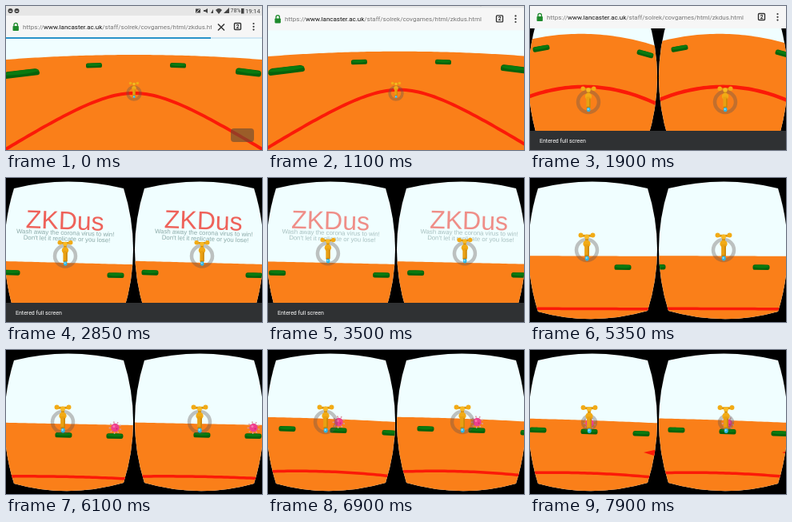
These frames come from a looping animation (320 by 180 pixels, 8000 ms). An HTML page with a canvas:

```html
<!DOCTYPE html>
<html lang="en">
<head>
<meta charset="utf-8">
<title>Tap game</title>
<style>
  html, body { margin: 0; width: 100%; height: 100%; overflow: hidden; background: #000; }
  #stage { position: relative; width: 320px; height: 180px; overflow: hidden; font-family: Roboto, Arial, sans-serif; }
  #stage div, #stage svg, canvas { position: absolute; left: 0; top: 0; }
  canvas { width: 320px; height: 180px; }
  #status { width: 320px; height: 12px; background: #e6e6e6; color: #444; }
  #status span { position: absolute; top: 1px; font-size: 7.5px; line-height: 11px; }
  #bar { width: 320px; height: 28px; background: #f6f6f6; }
  #url { left: 21px !important; top: 7px !important; height: 15px; overflow: hidden; white-space: nowrap; font-size: 8px; line-height: 15px; color: #777; }
  #url b { font-weight: 400; color: #111; }
  #load { top: 27px !important; width: 320px; height: 2px; background: #cfe6f3; }
  #fill { height: 2px; background: #2a93c9; }
  #toast { width: 320px; height: 24px; background: #2f3133; color: #fff; font-size: 7px; line-height: 26px; text-indent: 12px; }
</style>
</head>
<body>
<div id="stage">
  <canvas id="view"></canvas>
  <div id="bar">
    <svg width="320" height="28" fill="none" stroke="#333">
      <path d="M10 13.500v-2a2.200 2.200 0 0 1 4.400 0v2" stroke="#1e8a2c" stroke-width="1.3"/>
      <rect x="8.500" y="13" width="7.400" height="6" rx=".8" fill="#1e8a2c" stroke="none"/>
      <path id="stop" d="M265 10.500l8 8m0-8l-8 8" stroke-width="1.5"/>
      <rect x="285.500" y="9.500" width="8" height="8" rx="1" stroke-width="1.4"/>
      <text x="289.500" y="16" font-size="6.5" font-weight="700" text-anchor="middle" fill="#222" stroke="none">2</text>
      <g fill="#333" stroke="none"><circle cx="309.500" cy="10" r="1.1"/><circle cx="309.500" cy="13.800" r="1.1"/><circle cx="309.500" cy="17.600" r="1.1"/></g>
    </svg>
    <div id="url">https://<b>www.lancaster.ac.uk</b>/staff/solrek/covgames/html/zkdus.html</div>
    <div id="load"><div id="fill"></div></div>
  </div>
  <div id="status">
    <svg width="320" height="12" fill="#444">
      <circle cx="5.500" cy="6" r="3"/><circle cx="13.500" cy="6" r="3"/>
      <path d="M4 6.500h3M12 6.500h3" stroke="#e6e6e6"/>
      <rect x="237" y="3.500" width="6" height="5"/>
      <path d="M238 8l4-4" stroke="#e6e6e6"/>
      <path d="M247 5h2l3-2v6l-3-2h-2zM259 9V4l-3 5z"/>
      <path d="M262 5q4-4 8 0l-4 5zM272 9l7-7v7z"/>
      <rect x="294" y="3" width="3.500" height="6.500"/>
    </svg>
    <span style="left:280.500px;font-size:7px">78%</span><span style="left:299px">19:14</span>
  </div>
  <div id="toast">Entered full screen</div>
</div>
<script>
const LOOP = 8000, SKY = '#f0feff', FLOOR = '#fa7f19', RED = '#fb1a08', GOLD = '#f2ab16';
const $ = id => document.getElementById(id);
const cv = $('view'), g = cv.getContext('2d');
const dpr = window.devicePixelRatio || 1;
cv.width = 320 * dpr; cv.height = 180 * dpr;

// time, horizon, roll in degrees, title x, cursor x, cursor y, title alpha, cursor radius
const POSES = [
  [1900, 35, 2.2, 79, 73, 120, 0, 13],
  [2050, 35, 2.2, 79, 73, 119, 0, 13],
  [2200, 52, 2, 77, 73, 112, 0, 13],
  [2300, 52, 2, 77, 73, 112, 0, 13],
  [2350, 58, 2, 77, 73, 110, 1, 13],
  [2600, 82, 2, 74, 73, 104, 1, 13],
  [2700, 82, 2, 74, 73, 104, 1, 13],
  [2850, 106, 1.5, 72, 74, 97.5, 1, 13],
  [3550, 106, 1.2, 77, 75, 94, .7, 13],
  [4100, 104, .6, 86.5, 77, 90, .2, 13],
  [4450, 102, .4, 82, 75, 90, .1, 13],
  [5250, 97.5, .2, 51, 71, 90, 0, 13],
  [5350, 97.5, .2, 51, 71, 90, 0, 13],
  [6150, 92, 1.2, 4, 71, 90, 0, 13],
  [6900, 86, 2.1, -41, 72, 90, 0, 13],
  [7100, 86, 2.1, -42, 72, 90, 0, 13],
  [7900, 88, 2, -55, 74, 90.5, 0, 8]
];

const ramp = (t, a, b) => Math.min(1, Math.max(0, (t - a) / (b - a)));
const mix = (a, b, k) => a + (b - a) * k;

function poseAt(t) {
  let i = 0;
  while (i < POSES.length - 2 && POSES[i + 1][0] <= t) i++;
  const a = POSES[i], b = POSES[i + 1], k = ramp(t, a[0], b[0]);
  return a.map((v, j) => mix(v, b[j], k));
}

function trace(f, x0, x1) {
  g.beginPath();
  for (let x = x0; x <= x1; x += 4) g.lineTo(x, f(x));
}

function ground(f, x0, x1) {
  trace(f, x0, x1);
  g.lineTo(x1, 190);
  g.lineTo(x0, 190);
  g.fillStyle = FLOOR;
  g.fill();
}

function hoop(f, x0, x1, w) {
  trace(f, x0, x1);
  g.strokeStyle = RED;
  g.lineWidth = w;
  g.stroke();
}

function dot(x, y, rx, fill, ry = rx) {
  g.beginPath();
  g.ellipse(x, y, rx, ry, 0, 0, 7);
  g.fillStyle = fill;
  g.fill();
}

function bar(x, y, w, h, fill) {
  g.fillStyle = fill;
  g.fillRect(x, y, w, h);
}

function puck(x, y, w, h, angle) {
  g.save();
  g.translate(x, y);
  g.rotate(angle);
  g.beginPath();
  g.roundRect(-w / 2, -h / 2, w, h, [w / 8, w / 8, h / 3, h / 3]);
  g.fillStyle = '#06620b';
  g.fill();
  dot(0, -h * .18, w / 2 - .5, '#0a7a10', h * .3);
  g.restore();
}

function cursor(x, y, r, w) {
  g.beginPath();
  g.arc(x, y, r, 0, 7);
  g.strokeStyle = 'rgba(95,85,80,.36)';
  g.lineWidth = w;
  g.stroke();
}

function tap(x, y, s) {
  g.save();
  g.translate(x, y);
  g.scale(s, s);
  bar(-1.7, -15, 3.4, 9, '#d18d0c');
  bar(-6.5, -17, 13, 2.6, '#d9950e');
  dot(-6.8, -16.3, 2.7, GOLD);
  dot(6.8, -16.3, 2.7, GOLD);
  dot(0, -14.6, 2.7, '#f8b924');
  dot(0, -6.5, 4.2, GOLD);
  bar(-2.6, -6, 5.2, 13, '#e9a012');
  bar(1.2, -4, 1.4, 11, '#c98509');
  dot(0, 7.3, 2.6, '#c98509', 1.3);
  dot(.2, 10, 2.3, '#2bb5e8', 2.7);
  dot(-.3, 9.5, 1, '#9be4fa');
  g.restore();
}

function virus(x, y) {
  g.strokeStyle = '#c99a90';
  g.lineWidth = .8;
  for (let i = 0; i < 9; i++) {
    const a = i * Math.PI * 2 / 9 + .3, c = Math.cos(a), s = Math.sin(a);
    g.beginPath();
    g.moveTo(x + 4 * c, y + 4 * s);
    g.lineTo(x + 7 * c, y + 7 * s);
    g.stroke();
    dot(x + 7 * c, y + 7 * s, .9, '#d99aa0');
  }
  dot(x, y, 5.2, '#ee3f8e');
  dot(x - 1.5, y - 1.5, 1.5, '#f878b2');
  dot(x + 2, y + 1.5, 1, '#c82a70');
}

function title(x, h, roll, alpha) {
  if (alpha <= 0) return;
  g.save();
  g.translate(x, h);
  g.rotate(roll * 1.3);
  g.globalAlpha = alpha;
  g.textAlign = 'center';
  g.fillStyle = '#ee625a';
  g.font = '32px "Liberation Sans", Arial, sans-serif';
  g.fillText('ZKDus', 0, -42);
  g.fillStyle = '#8aa8a6';
  g.font = '7.8px "Liberation Sans", Arial, sans-serif';
  g.fillText('Wash away the corona virus to win!', 1, -35);
  g.fillText('Don\'t let it replicate or you lose!', 3, -27.5);
  g.restore();
}

function lens(right) {
  const m = x => right ? 320 - x : x;
  g.beginPath();
  g.moveTo(m(10), 13);
  g.quadraticCurveTo(m(77), -4, m(147), 13);
  g.quadraticCurveTo(m(171), 89, m(147), 166);
  g.quadraticCurveTo(m(77), 186, m(10), 167);
  g.quadraticCurveTo(m(-14), 90, m(10), 13);
  g.clip();
}

function eye(right, t, [, h, deg, tx, cx, cy, alpha, r]) {
  const roll = deg * Math.PI / 180, slope = Math.tan(roll);
  const sag = Math.max(0, 90 - h) * .2, dip = Math.max(0, 97 - h) * .27;
  const edge = (x, k) => h + slope * (x - 75) + k * ((x - 75) / 80) ** 2;
  g.save();
  lens(right);
  bar(0, 0, 320, 180, SKY);
  g.translate(right ? 173 : 0, 0);
  ground(x => edge(x, sag), -24, 180);
  hoop(x => edge(x, dip) + 66, -24, 180, h < 60 ? 4.5 : 3.5);
  title(tx, h, roll, alpha);
  for (const d of [-194, -129, -65, 65, 129, 194]) {
    const x = tx + d;
    if (x < -30 || x > 190) continue;
    puck(x, edge(x, sag) + 14, 21, 6.5, Math.atan(slope + sag * (x - 75) / 3200));
  }
  if (t > 4500) {
    const vx = tx + 129;
    virus(vx + .5, edge(vx, sag) + 3.5);
    const ax = tx + 197, ay = h + 40;
    g.beginPath();
    g.moveTo(ax, ay);
    g.lineTo(ax + 18, ay - 4);
    g.lineTo(ax + 16, ay + 5);
    g.fillStyle = RED;
    g.fill();
  }
  if (right) g.translate(-2, 0);
  cursor(cx, cy, r, 4.5);
  tap(cx, cy - .5, 1 + .1 * ramp(t, 4500, 5250));
  g.restore();
}

function mono(t) {
  const k = ramp(t, 0, 1550), dx = 5 * Math.sin(k * Math.PI), dy = -6 * k;
  bar(0, 0, 320, 180, SKY);
  g.save();
  g.translate(dx, dy);
  ground(x => 61 + 6 * ((x - 160) / 160) ** 2, -20, 340);
  hoop(x => 109 - 42 + Math.sqrt(1764 + .42 * (x - 160) ** 2), -20, 340, 4);
  puck(19, 84.5, 46, 8.5, -.12);
  puck(110, 74.3, 20, 6, -.04);
  puck(215, 74.3, 20, 6, .04);
  puck(303, 83, 32, 8, .12);
  g.restore();
  cursor(160, 109, 8, 3.5);
  tap(160, 107, .65);
  if (t < 900) {
    g.beginPath();
    g.roundRect(281, 153, 29, 17, 4);
    g.fillStyle = 'rgba(105,75,50,.65)';
    g.fill();
  }
}

function draw(t) {
  g.setTransform(dpr, 0, 0, dpr, 0, 0);
  if (t < 1900) mono(t);
  else {
    bar(0, 0, 320, 180, '#000');
    const pose = poseAt(t);
    eye(false, t, pose);
    eye(true, t, pose);
  }
  const hide = ramp(t, 900, 1150) * 12, loading = t < 850;
  $('status').style.transform = `translateY(${-hide}px)`;
  $('bar').style.transform = `translateY(${12 - hide}px)`;
  $('bar').style.display = t < 1950 ? '' : 'none';
  $('load').style.display = $('stop').style.display = loading ? '' : 'none';
  $('url').style.width = loading ? '236px' : '260px';
  $('fill').style.width = mix(256, 320, ramp(t, 0, 800)) + 'px';
  const toast = 180 - 24 * ramp(t, 1250, 1550) + 24 * ramp(t, 4250, 4500);
  $('toast').style.transform = `translateY(${toast}px)`;
}

const start = performance.now();
function tick() {
  const t = (performance.now() - start) % LOOP;
  draw(Math.floor(t / 50) * 50);
  requestAnimationFrame(tick);
}
tick();
</script>
</body>
</html>
```
